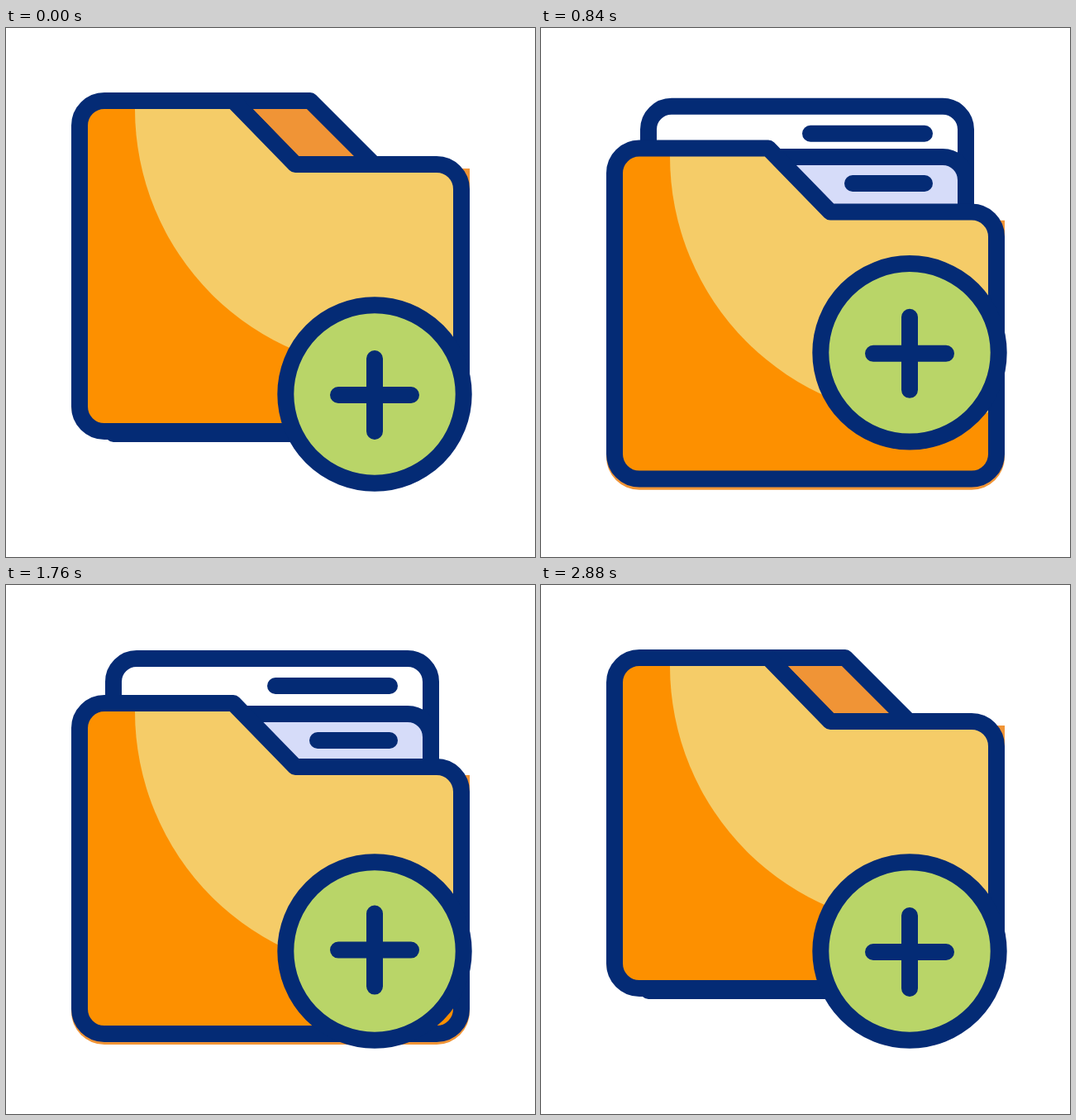
An HTML page that plays this animation: 640 px wide and 640 px high, repeating every 3000 ms.

```html
<!DOCTYPE html>
<html lang="en">
<head>
<meta charset="utf-8">
<title>Add to folder</title>
<style>
  html, body { margin: 0; width: 100%; height: 100%; overflow: hidden; background: #fff; }
  svg { display: block; width: 100vw; height: 100vh; }
  .line { stroke: #042b75; stroke-width: 20; stroke-linecap: round; stroke-linejoin: round; }
</style>
</head>
<body>
<svg viewBox="0 0 640 640">
  <defs>
    <path id="folder" d="M119 88H275L350 165H521a30 30 0 0 1 30 30V458a30 30 0 0 1-30 30H119a30 30 0 0 1-30-30V118a30 30 0 0 1 30-30Z"/>
    <path id="sheet" d="M158 89H486a28 28 0 0 1 28 28V370H130V117a28 28 0 0 1 28-28Z"/>
    <path id="plus" d="M402 444H490M446 400V488"/>
    <clipPath id="inFolder"><use href="#folder"/></clipPath>
    <clipPath id="inBadge"><circle cx="446" cy="443" r="108"/></clipPath>
  </defs>

  <g id="back">
    <path fill="#f09436" d="M79 170H561V456a40 40 0 0 1-40 40H119a40 40 0 0 1-40-40Z"/>
    <path class="line" fill="#f09436" d="M275 88H368L446 166H350Z"/>
  </g>

  <g id="sheet1" class="line">
    <use href="#sheet" fill="#fff"/>
    <path d="M326 122H464"/>
  </g>
  <g id="sheet2" class="line">
    <use href="#sheet" y="67" fill="#d6dcf9"/>
    <path d="M377 188H464"/>
  </g>

  <g id="front">
    <use href="#folder" fill="#fd9000"/>
    <circle cx="473" cy="98" r="317" fill="#f5cc68" clip-path="url(#inFolder)"/>
    <use href="#folder" class="line" fill="none"/>
  </g>

  <g id="badge">
    <circle cx="446" cy="443" r="108" fill="#b9d568"/>
    <g clip-path="url(#inBadge)">
      <g id="scroll" class="line" fill="none">
        <use href="#plus"/>
        <use href="#plus" y="201"/>
      </g>
    </g>
    <circle class="line" cx="446" cy="443" r="107.7" fill="none"/>
  </g>
</svg>
<script>
  const LOOP = 3000, STEP = 40;

  // Vertical offsets as [time, y], eased between neighbours.
  const tracks = {
    back:   [[424, 0], [904, 66], [1680, 66], [2108, 0]],
    front:  [[424, 0], [904, 60.5], [1684, 60.5], [2094, 0]],
    sheet1: [[500, 95], [900, 0], [1840, 0], [2270, 95]],
    sheet2: [[430, 54], [830, 0], [1840, 0], [2270, 54]],
    badge:  [[360, 0], [960, -56], [1520, 0]],
    scroll: [[1720, 0], [2340, -201]]
  };

  const ease = u => u * u * (3 - 2 * u);

  function valueAt(keys, t) {
    if (t <= keys[0][0]) return keys[0][1];
    for (let i = 1; i < keys.length; i++) {
      const [t0, y0] = keys[i - 1], [t1, y1] = keys[i];
      if (t < t1) return y0 + (y1 - y0) * ease((t - t0) / (t1 - t0));
    }
    return keys[keys.length - 1][1];
  }

  const parts = Object.entries(tracks).map(([id, keys]) => [document.getElementById(id), keys]);
  const start = performance.now();

  function draw() {
    const time = (performance.now() - start) % LOOP;
    const t = Math.floor(time / STEP) * STEP;
    for (const [el, keys] of parts) {
      el.setAttribute("transform", `translate(0 ${valueAt(keys, t).toFixed(2)})`);
    }
    requestAnimationFrame(draw);
  }
  draw();
</script>
</body>
</html>
```
